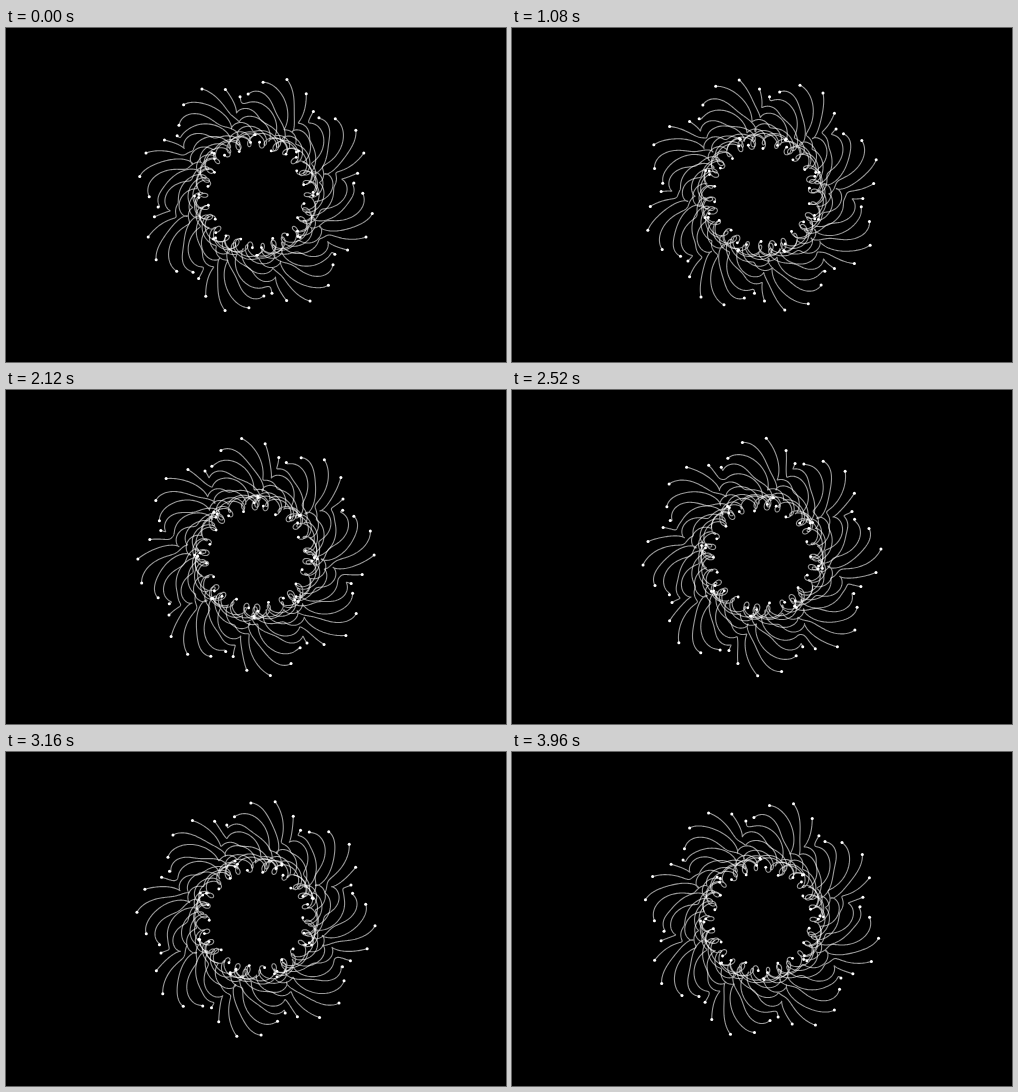
Animation, 500 px wide and 334 px high, one loop 4 s. Source, as an HTML page with a canvas:

```html
<!DOCTYPE html>
<html lang="en">
<head>
<meta charset="utf-8">
<title>Tendril ring</title>
<style>
  html, body { margin: 0; width: 100%; height: 100%; overflow: hidden; background: #000; }
  canvas { display: block; width: 500px; height: 334px; }
</style>
</head>
<body>
<canvas id="stage" width="500" height="334"></canvas>
<script>
const LOOP = 4000;
const COUNT = 42;
const LOBES = 8;
const DELAY = 1.8;
const SAMPLES = 180;
const TAU = Math.PI * 2;
const START = -75 * TAU / 360;
const TWIST = 74 * TAU / 360;
const ctx = document.getElementById('stage').getContext('2d');

// Each loop, every strand moves back into its neighbour's place.
const angleOf = (i, t) => START + TAU * (i - t) / COUNT;
const phaseOf = (i, t, turns) => TAU * (LOBES * (i - t) / COUNT - turns * t);

function place(angle, radius, side) {
  const c = Math.cos(angle), s = Math.sin(angle);
  return [250 + radius * c - side * s, 167 + radius * s + side * c];
}

function outer(i, t) {
  const phase = phaseOf(i, t, 1);
  return place(angleOf(i, t), 109 + 10.5 * Math.cos(phase), 6 * Math.sin(phase));
}

function inner(i, t) {
  const phase = -phaseOf(i, t, 2);
  return place(angleOf(i, t) + TWIST, 54 + 7.5 * Math.cos(phase), 7.5 * Math.sin(phase));
}

// Both ends lag behind in time towards the far end of the strand.
function strand(i, t) {
  ctx.beginPath();
  for (let k = 0; k <= SAMPLES; k++) {
    const p = k / SAMPLES;
    const a = outer(i, t - DELAY * p);
    const b = inner(i, t - DELAY * (1 - p));
    ctx.lineTo(a[0] + (b[0] - a[0]) * p, a[1] + (b[1] - a[1]) * p);
  }
  ctx.stroke();
}

function dot([x, y], radius) {
  ctx.beginPath();
  ctx.arc(x, y, radius, 0, TAU);
  ctx.fill();
}

function draw(now) {
  const t = (now % LOOP) / LOOP;
  ctx.fillStyle = '#000';
  ctx.fillRect(0, 0, 500, 334);
  ctx.strokeStyle = 'rgba(255,255,255,0.6)';
  ctx.lineWidth = 1.1;
  ctx.lineJoin = 'round';
  for (let i = 0; i < COUNT; i++) strand(i, t);
  ctx.fillStyle = '#fff';
  for (let i = 0; i < COUNT; i++) {
    dot(outer(i, t), 1.5);
    dot(inner(i, t), 1.4);
  }
}

function frame() {
  draw(performance.now());
  requestAnimationFrame(frame);
}
frame();
</script>
</body>
</html>
```
